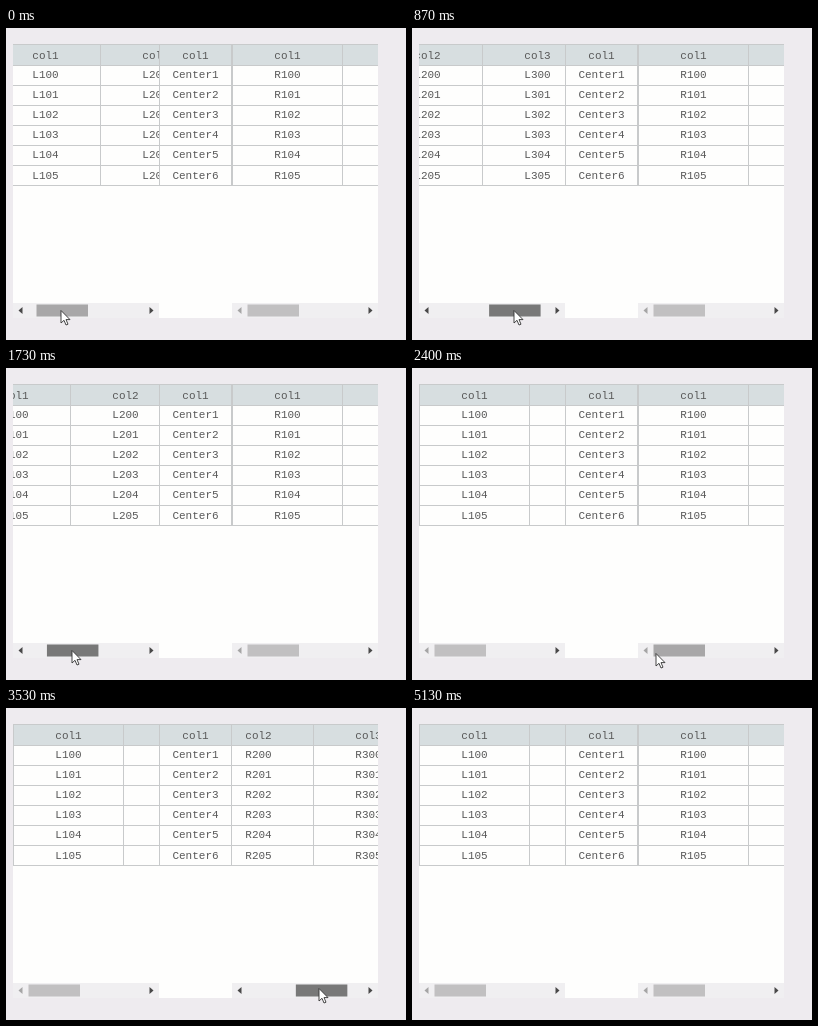
An HTML page that plays this animation: 400x312 px, repeating every 5200 ms.

```html
<!DOCTYPE html>
<html lang="en">
<head>
<meta charset="utf-8">
<title>Split grid scrolling</title>
<style>
  html, body { margin: 0; width: 100%; height: 100%; overflow: hidden; background: #eeebef; }
  svg { display: block; }
  text { font: 11px "Courier New", "Liberation Mono", monospace; text-anchor: middle; fill: #585858; }
  .line { stroke: #c8cacb; fill: none; shape-rendering: crispEdges; }
</style>
</head>
<body>
<svg id="stage" width="400" height="312" viewBox="0 0 400 312"></svg>
<script>
const LOOP = 5200, COL = 110, VIEW = 146, MAX_SCROLL = 184, TRAVEL = 64, THUMB_X = 15.5;

const clamp = (v, lo, hi) => Math.min(hi, Math.max(lo, v));
const ramp = (t, from, to) => clamp((t - from) / (to - from), 0, 1);
const mix = (a, b, p) => a + (b - a) * p;

// drag: scroll the hand asks for, which may run past the ends of the track.
const panes = {
  L: {
    x: 7, grip: 25.4, hover: 0, press: 400, release: 1930,
    drag: t => 23 + 172 * ramp(t, 595, 950) - 215 * ramp(t, 1400, 1900)
  },
  R: {
    x: 226, grip: 23.5, hover: 2330, press: 2620, release: 4130,
    drag: t => MAX_SCROLL * ramp(t, 2665, 3000) - 269 * ramp(t, 3450, 3930)
  }
};

const vLine = x => `<path class="line" d="M${x} 16V158"/>`;
const label = (x, y, s) => `<text x="${x}" y="${y}">${s}</text>`;

function column(x, title, cell) {
  let out = label(x, 30.5, title);
  for (let k = 0; k < 6; k++) out += label(x, Math.floor(50.5 + 20.1 * k), cell(k));
  return out;
}

function grid(name) {
  let out = vLine(.5) + vLine(3 * COL - .5);
  for (let c = 1; c <= 3; c++) {
    if (c < 3) out += vLine(c * COL + .5);
    out += column((c - .5) * COL + .5, 'col' + c, k => name + c + '0' + k);
  }
  return out;
}

const paneMarkup = name => `
  <svg x="${panes[name].x}" width="${VIEW}" height="312">
    <g id="grid${name}">${grid(name)}</g>
    <rect y="275" width="${VIEW}" height="15" fill="#f0eff1"/>
    <path id="back${name}" d="M9.5 279v7l-4-3.5z"/>
    <path id="next${name}" d="M136.5 279v7l4-3.5z"/>
    <rect id="thumb${name}" y="276.5" width="51.5" height="12"/>
  </svg>`;

let rules = 'M7 16.5H372';
for (let k = 0; k < 7; k++) rules += `M7 ${37.5 + 20 * k}H372`;

document.getElementById('stage').innerHTML = `
  <rect x="7" y="16" width="365" height="274" fill="#fefefd"/>
  <rect x="7" y="17" width="365" height="20" fill="#d7dee0"/>
  <path class="line" d="${rules}"/>
  ${paneMarkup('L')}${paneMarkup('R')}
  ${vLine(153.5)}${vLine(225.5)}
  ${column(189.5, 'col1', k => 'Center' + (k + 1))}
  <path id="cursor" d="M0 .5V13L3 10.3 5 15 7 14.2 5 9.6H9z"
    fill="#fff" stroke="#333" stroke-width=".9"/>`;

const set = (id, attr, value) => document.getElementById(id).setAttribute(attr, value);
const arrowColor = on => on ? '#484848' : '#a5a5a5';
const thumbX = scroll => THUMB_X + scroll / MAX_SCROLL * TRAVEL;
const handX = (pane, t) => pane.x + thumbX(pane.drag(t)) + pane.grip;

function drawPane(name, t) {
  const { drag, hover, press, release } = panes[name];
  const scroll = Math.round(clamp(drag(t), 0, MAX_SCROLL));
  const color = t < hover || t >= release ? '#c1c0c1' : t < press ? '#a8a7a8' : '#787878';
  set('grid' + name, 'transform', `translate(${-scroll})`);
  set('thumb' + name, 'x', thumbX(scroll));
  set('thumb' + name, 'fill', color);
  set('back' + name, 'fill', arrowColor(scroll > 0));
  set('next' + name, 'fill', arrowColor(scroll < MAX_SCROLL));
}

// The pointer holds one thumb, swings below to the other, then lifts away.
function drawCursor(t) {
  const p = ramp(t, 1930, 2448);
  const x = mix(handX(panes.L, t), handX(panes.R, t), p);
  const y = 282.5 - 2 * p + 16 * Math.sin(Math.PI * p) - 18 * ramp(t, 4330, 4720);
  set('cursor', 'transform', `translate(${Math.floor(x)} ${Math.floor(y)})`);
  set('cursor', 'visibility', t < 4800 ? 'visible' : 'hidden');
}

const start = performance.now();
function tick() {
  const t = (performance.now() - start) % LOOP;
  drawPane('L', t);
  drawPane('R', t);
  drawCursor(t);
  requestAnimationFrame(tick);
}
tick();
</script>
</body>
</html>
```
